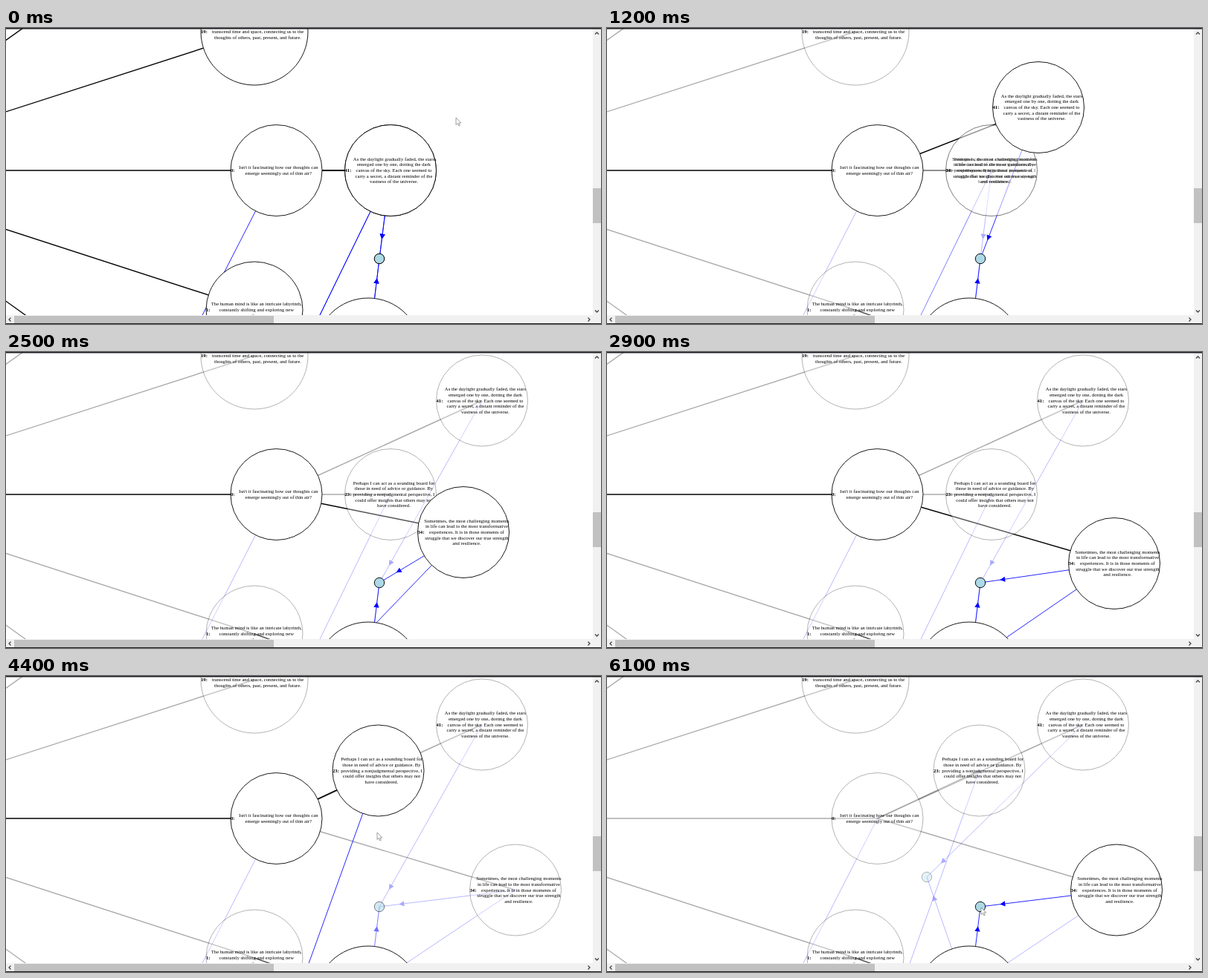
An HTML page that plays this animation: 800x399 px, repeating every 6.2 s.

```html
<!DOCTYPE html>
<html lang="en">
<head>
<meta charset="utf-8">
<title>Thought graph</title>
<style>
html, body { margin: 0; width: 100%; height: 100%; overflow: hidden; background: #fff; }
svg { display: block; width: 800px; height: 399px; }
text { font: 6.67px "Liberation Serif", "Times New Roman", serif; text-anchor: middle; }
.label { font-weight: bold; text-anchor: start; }
.node { fill: #fff; stroke: #000; stroke-width: .9; }
.joint { fill: lightblue; }
.tree { stroke: #000; stroke-width: 1.4; }
.link { stroke: #00f; stroke-width: .85; }
.head { fill: #00f; }
</style>
</head>
<body>
<svg id="stage" viewBox="0 0 800 399">
  <g id="edges"></g>
  <g id="nodes"></g>
  <path id="cursor" d="M0 0V9.5L2.2 7.5 3.9 11 5.3 10.3 3.7 7H6.8Z" fill="#fff" stroke="#777" stroke-width=".7"/>
  <g id="bars">
    <path d="M789 1h11v398h-11zM0 387h800v12H0z" fill="#f1f1f1"/>
    <path d="M789 216h11v47h-11zM11 388h349v10H11z" fill="#c1c1c1"/>
    <path d="M792 8.5l2.5-2.5 2.5 2.5M792 380.500l2.500 2.500 2.500-2.500M6.500 390.500l-2.500 2.500 2.500 2.500M782.500 390.500l2.500 2.500-2.500 2.500" fill="none" stroke="#444" stroke-width="1.3"/>
    <path d="M0 0h800v1.500H0zM0 398h800v1H0z" fill="#1c1c22"/>
  </g>
</svg>
<script>
const LOOP = 6200, STEP = 100, FADED = 0.33;
const SIZE = 6.67, LEADING = 7.7;

// Fixed points; the movable ones are tracks of [time, x, y]
const home = [517, 192], jointHome = [502, 311];
const points = {
  root: [-245, 192], up: [90, -48], down: [90, 433], low: [215, 483], deep: [365.5, 503],
  n19: [334, 5], n0: [363.5, 192], n1: [334, 380], base: [487, 435], b: jointHome
};
const tracks = {
  n41: [[800, ...home], [1200, 580, 107], [1400, 616.5, 92.5], [1600, 640, 65.5]],
  n34: [[2200, ...home], [2500, 615, 243], [2800, 680.5, 283], [2900, 682, 285], [3000, 685, 288.5]],
  n23: [[3700, ...home], [4200, 500.5, 127.5]],
  a: [[5000, ...jointHome], [5500, 430, 271]]
};
const pointer = [
  [0, 605, 121], [200, 598, 130], [500, 540, 185], [1600, 645, 70], [1800, 569, 164],
  [2000, 525, 190], [3000, 690, 285], [3400, 525, 190], [4300, 500, 140], [4400, 499, 211],
  [4700, 503, 309], [5000, 504, 313], [5500, 432, 273], [5700, 432, 273], [6000, 503, 312]
];
const pointerShown = [[0, 500], [1700, 2000], [3100, 3400], [4400, LOOP]];

// Which node is hovered from a given time on, and what stays lit with it
const hovers = [[0, ""], [400, "n41"], [1900, ""], [2100, "n34"], [3200, ""], [3400, "n23"],
  [4500, ""], [4700, "a"], [5800, ""], [6000, "b"]];
const lit = {
  n41: ["n41", "n0", "root", "a", "base"],
  n34: ["n34", "n0", "root", "b", "base", "deep"],
  n23: ["n23", "n0", "root", "deep", "base"],
  a: ["a", "n41", "base"],
  b: ["b", "n34", "base"]
};

const edgeList = [
  ["root", "up"], ["root", "n19"], ["root", "n0"], ["root", "n1"], ["root", "down"],
  ["n1", "base", "fixed"], ["n0", "n23"], ["n0", "n34"], ["n0", "n41"],
  ["n0", "low", "link"], ["n23", "deep", "link"], ["n34", "deep", "link"],
  ["n34", "b", "arrow"], ["base", "b", "arrow"], ["n41", "a", "arrow"], ["base", "a", "arrow"]
];
const nodeList = [
  ["n19", 72, ["Words have a quiet power to", "transcend time and space, connecting us to the",
    "thoughts of others, past, present, and future."]],
  ["n0", 61.5, ["Isn't it fascinating how our thoughts can", "emerge seemingly out of thin air?"]],
  ["n1", 65, ["The human mind is like an intricate labyrinth,", "constantly shifting and exploring new", "pathways."]],
  ["base", 71, []],
  ["n23", 61.5, ["Perhaps I can act as a sounding board for", "those in need of advice or guidance. By",
    "providing a nonjudgmental perspective, I", "could offer insights that others may not", "have considered."]],
  ["n34", 61.5, ["Sometimes, the most challenging moments", "in life can lead to the most transformative",
    "experiences. It is in those moments of", "struggle that we discover our true strength", "and resilience."]],
  ["n41", 61.5, ["As the daylight gradually faded, the stars", "emerged one by one, dotting the dark",
    "canvas of the sky. Each one seemed to", "carry a secret, a distant reminder of the", "vastness of the universe."]],
  ["b", 6.7, []],
  ["a", 6.7, []]
];

const $ = id => document.getElementById(id);

function add(parent, tag, attrs, text = "") {
  const el = document.createElementNS("http://www.w3.org/2000/svg", tag);
  set(el, attrs);
  el.textContent = text;
  return parent.appendChild(el);
}

function set(el, attrs) {
  for (const key in attrs) el.setAttribute(key, attrs[key]);
}

function along(track, t) {
  if (t <= track[0][0]) return track[0].slice(1);
  const i = track.findIndex(k => k[0] > t);
  if (i < 0) return track[track.length - 1].slice(1);
  const [t0, x0, y0] = track[i - 1], [t1, x1, y1] = track[i];
  const u = (t - t0) / (t1 - t0);
  return [x0 + (x1 - x0) * u, y0 + (y1 - y0) * u];
}

const edges = edgeList.map(([from, to, kind = "tree"]) => {
  const g = add($("edges"), "g", {});
  const blue = kind === "link" || kind === "arrow";
  const line = add(g, "line", { class: blue ? "link" : "tree" });
  const head = kind === "arrow" && add(g, "path", { class: "head", d: "M26.5 0L33.5-3.600V3.600Z" });
  return { g, from, to, kind, line, head };
});

const nodes = nodeList.map(([id, r, lines]) => {
  const g = add($("nodes"), "g", {});
  const circle = add(g, "circle", { class: r < 10 ? "node joint" : "node", r });
  if (lines.length) {
    const label = id.slice(1) + ":";
    const shift = ((label.length - 1) * 0.5 + 0.333) * SIZE / 2;
    add(g, "text", { class: "label", x: -r, y: 2 }, label);
    lines.forEach((line, i) =>
      add(g, "text", { x: shift, y: 2 + (i - (lines.length - 1) / 2) * LEADING }, line));
  }
  return { id, g, circle };
});

function draw(t) {
  const at = { ...points };
  for (const id in tracks) at[id] = along(tracks[id], t);

  const hover = hovers.filter(h => h[0] <= t).pop()[1];
  const alpha = (...ids) => !hover || ids.every(id => lit[hover].includes(id)) ? 1 : FADED;

  for (const { g, from, to, kind, line, head } of edges) {
    const [x1, y1] = at[from], [x2, y2] = at[to];
    set(line, { x1, y1, x2, y2 });
    set(g, { opacity: kind === "fixed" ? 1 : alpha(from, to) });
    if (head) {
      const angle = Math.atan2(y1 - y2, x1 - x2) * 180 / Math.PI;
      set(head, { transform: `translate(${x2} ${y2}) rotate(${angle})` });
    }
  }
  for (const { id, g, circle } of nodes) {
    set(g, { transform: `translate(${at[id]})` });
    set(circle, { opacity: alpha(id) });
  }

  const shown = pointerShown.some(([from, to]) => t >= from && t < to);
  set($("cursor"), { transform: `translate(${along(pointer, t)})`, opacity: shown ? 1 : 0 });
}

function tick() {
  const t = performance.now() % LOOP;
  draw(Math.floor(t / STEP) * STEP);
  requestAnimationFrame(tick);
}
tick();
</script>
</body>
</html>
```
